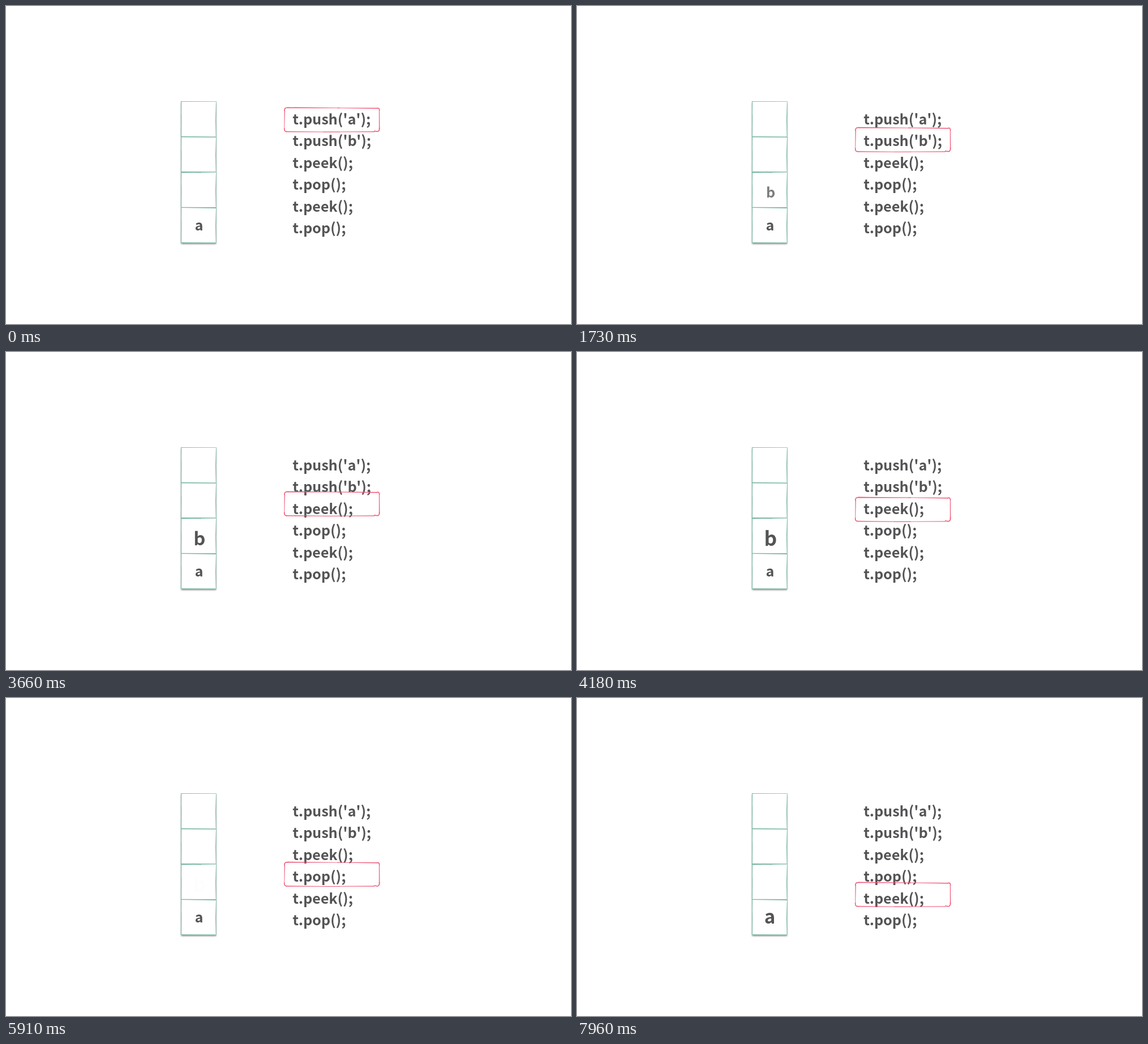
These frames come from a looping animation (998 px wide and 561 px high, 8 s). An HTML page:

```html
<!DOCTYPE html>
<html lang="en">
<head>
<meta charset="utf-8">
<title>Stack operations</title>
<style>
  html, body { margin: 0; width: 100%; height: 100%; overflow: hidden; background: #fff; }
  svg { display: block; width: 100vw; height: 100vh; }
  text { font: 700 25.2px "Noto Sans CJK SC", "Noto Sans CJK JP", "Noto Sans CJK", "Noto Sans", sans-serif; fill: #545456; }
  .item { text-anchor: middle; }
  .box { filter: drop-shadow(0 2px 1.6px rgba(0, 0, 0, .45)); }
</style>
</head>
<body>
<svg id="stage" viewBox="0 0 998 561">
  <rect class="box" x="309.5" y="169" width="61.5" height="249" fill="#fff"/>
  <g id="cells" fill="#7db8a6"></g>
  <g id="code"></g>
  <text id="a" class="item" x="341" y="396.3">a</text>
  <text id="b" class="item" x="342" y="338.3">b</text>
  <g id="marker" fill="#ee5273" stroke="#ee5273"></g>
</svg>
<script>
const LOOP = 8000, FIRST = 1090, PERIOD = 2130, TICK = 40, MOVE = 1000;
const ROW = 38.55, PEEK = 0.4;
const $ = id => document.getElementById(id);

function add(parent, tag, attrs, text = '') {
  const el = document.createElementNS('http://www.w3.org/2000/svg', tag);
  for (const key in attrs) el.setAttribute(key, attrs[key]);
  el.textContent = text;
  parent.append(el);
  return el;
}

// A hand-drawn line whose width changes from w1 to w2.
function pen(parent, x1, y1, x2, y2, w1, w2, opacity = 1) {
  const len = Math.hypot(x2 - x1, y2 - y1);
  const nx = (y1 - y2) / len / 2, ny = (x2 - x1) / len / 2;
  const d = `M${x1 + nx * w1} ${y1 + ny * w1}L${x2 + nx * w2} ${y2 + ny * w2}` +
    `L${x2 - nx * w2} ${y2 - ny * w2}L${x1 - nx * w1} ${y1 - ny * w1}Z`;
  add(parent, 'path', { d, opacity, stroke: 'none' });
}

function drawCells() {
  const g = $('cells');
  for (let i = 0; i < 4; i++) {
    const y = 168.6 + i * 62.4;
    pen(g, 309.6, y, 309.2, y + 62, 1.4, 0.9, 0.85);
    pen(g, 310.6, y + 22, 309.6, y + 62, 0.3, 1.2, 0.6);
    pen(g, 371.4, y, 370.4, y + 32, 0.9, 1.5, 0.85);
    pen(g, 370.4, y + 32, 371, y + 62, 1.5, 1, 0.85);
  }
  pen(g, 308.8, 168.6, 371.5, 168.6, 1, 0.8, 0.9);
  pen(g, 309, 230.7, 371.5, 231.3, 1.8, 1.4);
  pen(g, 309, 293.2, 371, 292.8, 2.4, 1.2);
  pen(g, 310, 292.6, 345, 294.2, 1.2, 0.6);
  pen(g, 309, 355.3, 371, 356, 1.2, 1.8);
  pen(g, 309, 417.6, 371, 418.2, 1.2, 1.8);
}

function drawMarker() {
  const g = $('marker');
  pen(g, 497, 179.4, 590, 179.9, 1.8, 0.9);
  pen(g, 585, 179.8, 656, 180.6, 0.8, 1.5);
  pen(g, 492.2, 184, 491.6, 217, 1.6, 0.9, 0.8);
  pen(g, 659.4, 184, 659.6, 217, 1.1, 1.6, 0.9);
  pen(g, 495, 221.6, 590, 222.4, 1.7, 0.8, 0.85);
  pen(g, 560, 222.2, 651, 221.8, 0.8, 1.4, 0.85);
  const corners = 'M492 185Q491 179 498 179.4M655 180.4Q660 179 659.5 185' +
    'M491.7 215Q491 222 496 221.4M650 220.6L656 221.6Q660 221 659.5 215';
  add(g, 'path', { d: corners, fill: 'none', 'stroke-width': 1.5 });
}

// The standard "ease" curve: cubic-bezier(.25, .1, .25, 1).
function ease(x) {
  if (x <= 0) return 0;
  if (x >= 1) return 1;
  let lo = 0, hi = 1;
  for (let i = 0; i < 24; i++) {
    const s = (lo + hi) / 2;
    if (0.75 * s * (1 - s) + s ** 3 < x) lo = s; else hi = s;
  }
  return 0.3 * lo * (1 - lo) ** 2 + 3 * lo * lo * (1 - lo) + lo ** 3;
}

// Progress of the n-th move, advancing in fixed ticks.
function progress(time, n) {
  const tick = Math.floor((time - FIRST - n * PERIOD) / TICK);
  return tick < 0 ? 0 : tick >= 24 ? 1 : ease((tick * TICK + 6) / MOVE);
}

function zoom(el, amount, cx, cy) {
  const k = 1 + PEEK * amount;
  el.setAttribute('transform', `translate(${cx} ${cy}) scale(${k}) translate(${-cx} ${-cy})`);
}

function render(time) {
  const [push, peek, pop, peekAgain] = [0, 1, 2, 3].map(n => progress(time, n));
  $('marker').setAttribute('transform', `translate(0 ${ROW * (push + peek + pop + peekAgain)})`);
  $('b').setAttribute('opacity', push ** 3 * (1 - pop) ** 3);
  zoom($('b'), peek, 342.6, 329.6);
  zoom($('a'), peekAgain, 342.4, 391);
}

["t.push('a');", "t.push('b');", 't.peek();', 't.pop();', 't.peek();', 't.pop();']
  .forEach((line, i) => add($('code'), 'text', { x: 506.3, y: 208.5 + i * ROW }, line));
drawCells();
drawMarker();

const start = performance.now();
function frame() {
  render((performance.now() - start) % LOOP);
  requestAnimationFrame(frame);
}
frame();
</script>
</body>
</html>
```
